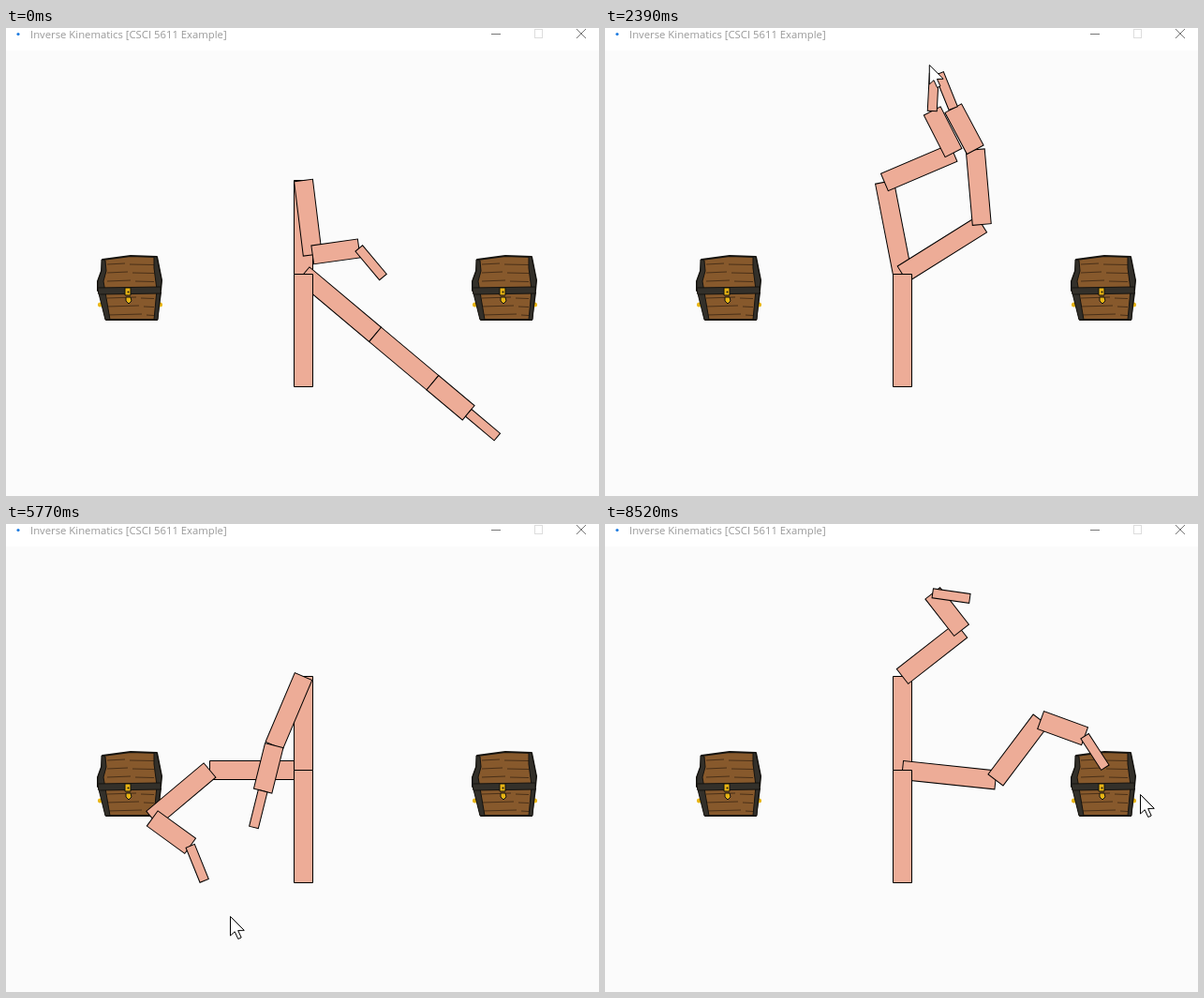
Recreate the animation shown at these times as an HTML page with a canvas. Size 633x499 px, loop 8.55 s.

```html
<!DOCTYPE html>
<html lang="en">
<head>
<meta charset="utf-8">
<title>Inverse Kinematics</title>
<style>
html, body { margin: 0; width: 100%; height: 100%; overflow: hidden; background: #fff; }
canvas { display: block; width: 633px; height: 499px; }
</style>
</head>
<body>
<canvas id="stage" width="633" height="499"></canvas>
<script>
const ctx = document.getElementById('stage').getContext('2d');
const LOOP = 8550;
const LENGTHS = [100, 80, 50, 40];
const ROOT = [317.5, 262.5];
const SKIN = '#edac97', WOOD = '#87592c', GRAIN = '#4a3018', IRON = '#33302a', DARK = '#15130f', GOLD = '#e8b414';

// Key poses: time, then the joint angles of the left and the right arm,
// in degrees, each relative to the joint before.
const POSES = [
  [60, -90, 173, -91, 58, 40, 0, 0, 0],
  [1500, -90, 103, -90, 39, -12, -48, -11, 10],
  [2390, -101, 78, -94, 30, -32, -63, -23, 6],
  [3710, -151, 30, -90, 53, -90, -80, 1, -3],
  [5770, -180, -40, -104, 32, -90, -157, -9, 0],
  [7410, -117, 4, -112, 93, -41, -105, 64, 66],
  [8520, -90, 52, -90, 136, 6, -59, 73, 37]
];
// Turning points of the pointer: time, x, y.
const POINTER = [
  [60, 530, 512], [600, 590, 345], [1500, 497, 79], [2390, 346, 39],
  [3710, 7, 110], [4220, 66, 330], [5000, 150, 434], [5770, 239, 418],
  [6550, 108, 220], [7100, 250, 68], [7410, 385, 113], [8520, 571, 288]
];

// Smooth interpolation that never overshoots a key.
function sample(keys, t) {
  const last = keys.length - 1;
  const now = Math.min(Math.max(t, keys[0][0]), keys[last][0]);
  const i = Math.max(0, keys.findIndex(k => k[0] >= now) - 1);
  const span = keys[i + 1][0] - keys[i][0];
  const u = (now - keys[i][0]) / span;
  const slope = (k, c) => (keys[k + 1][c] - keys[k][c]) / (keys[k + 1][0] - keys[k][0]);
  const tangent = (k, c) => {
    const a = slope(Math.max(k - 1, 0), c);
    const b = slope(Math.min(k, last - 1), c);
    return a * b <= 0 ? 0 : 2 * a * b / (a + b);
  };
  return keys[i].slice(1).map((p, n) => {
    const c = n + 1;
    return p + (keys[i + 1][c] - p) * u * u * (3 - 2 * u)
      + span * u * (1 - u) * ((1 - u) * tangent(i, c) - u * tangent(i + 1, c));
  });
}

// A short rest after the first reach, caught up before the next pose.
function clock(t) {
  const [reach, rest, next] = [1500, 1610, 2390];
  if (t < reach || t > next) return t;
  return reach + Math.max(0, t - rest) * (next - reach) / (next - rest);
}

function poly(points, fill, stroke, width = 1) {
  ctx.beginPath();
  points.forEach(([x, y]) => ctx.lineTo(x, y));
  ctx.closePath();
  ctx.fillStyle = fill;
  ctx.fill();
  ctx.strokeStyle = stroke;
  ctx.lineWidth = width;
  ctx.stroke();
}

function line(x1, y1, x2, y2, color) {
  ctx.beginPath();
  ctx.moveTo(x1, y1);
  ctx.lineTo(x2, y2);
  ctx.strokeStyle = color;
  ctx.lineWidth = 1;
  ctx.stroke();
}

function dot(x, y, r, color) {
  ctx.beginPath();
  ctx.arc(x, y, r, 0, Math.PI * 2);
  ctx.fillStyle = color;
  ctx.fill();
}

function limb(x, y, w, h) {
  poly([[x, y], [x + w, y], [x + w, y + h], [x, y + h]], SKIN, '#000');
}

function arm(angles) {
  ctx.save();
  ctx.translate(...ROOT);
  angles.forEach((angle, i) => {
    const wide = i < 3 ? 20 : 10;
    ctx.rotate(angle * Math.PI / 180);
    limb(0, -wide / 2, LENGTHS[i], wide);
    ctx.translate(LENGTHS[i], 0);
  });
  ctx.restore();
}

function chest(x, y) {
  ctx.save();
  ctx.translate(x, y);
  ctx.lineJoin = 'round';
  dot(3.5, 53, 2.5, GOLD);
  dot(67.5, 53, 2.5, GOLD);
  poly([[3, 40], [68, 40], [64, 69], [10, 69]], WOOD, DARK, 2);
  poly([[6, 5], [36, 1], [64, 2], [69, 27], [68, 38], [1, 38], [1, 28], [5, 17]], WOOD, DARK, 2);
  for (let row = 10; row < 66; row += 9) {
    const gap = 20 + row * 7 % 30;
    line(11, row, gap, row - 1, GRAIN);
    line(gap + 5, row, 61, row + 0.5, GRAIN);
  }
  // iron straps, rim and clasp
  poly([[5, 5], [9, 6], [10, 17], [7, 28], [14, 69], [9, 69], [1, 37], [1, 28], [5, 17]], IRON, DARK);
  poly([[61, 2], [64, 2], [69, 27], [65, 69], [61, 69], [64, 37], [61, 14]], IRON, DARK);
  poly([[1, 35], [68, 34], [68, 41], [2, 42]], IRON, DARK);
  poly([[30, 35], [36, 35], [36, 43], [30, 43]], GOLD, DARK);
  poly([[31, 45], [36, 45], [37, 49], [34, 52], [31, 49]], GOLD, DARK);
  dot(33.5, 39.5, 1, DARK);
  ctx.restore();
}

function pointer(x, y) {
  ctx.save();
  ctx.translate(x + 0.5, y + 0.5);
  poly([[0, 0], [0, 20.5], [4.7, 16.2], [8.3, 24], [11.7, 22.5], [8.2, 15], [14.8, 14.8]], '#fff', '#000');
  ctx.restore();
}

function titleBar() {
  ctx.fillStyle = '#fff';
  ctx.fillRect(0, 0, 633, 24);
  dot(13, 6.5, 1.6, '#1d7be0');
  ctx.fillStyle = '#999';
  ctx.font = '11.3px "Open Sans", "Noto Sans", sans-serif';
  ctx.fillText('Inverse Kinematics [CSCI 5611 Example]', 26, 11);
  line(518, 6.5, 528, 6.5, '#777');
  ctx.strokeStyle = '#ddd';
  ctx.strokeRect(564.5, 1.5, 8, 9);
  line(609, 1, 619, 11, '#777');
  line(619, 1, 609, 11, '#777');
}

function draw(t) {
  const angles = sample(POSES, t);
  ctx.fillStyle = '#fbfbfb';
  ctx.fillRect(0, 0, 633, 499);
  titleBar();
  chest(97, 242);
  chest(497, 242);
  arm(angles.slice(0, 4));
  arm(angles.slice(4));
  limb(307.5, 262.5, 20, 120);
  pointer(...sample(POINTER, t));
}

const begin = performance.now();
function tick() {
  draw(clock((performance.now() - begin) % LOOP));
  requestAnimationFrame(tick);
}
tick();
</script>
</body>
</html>
```
